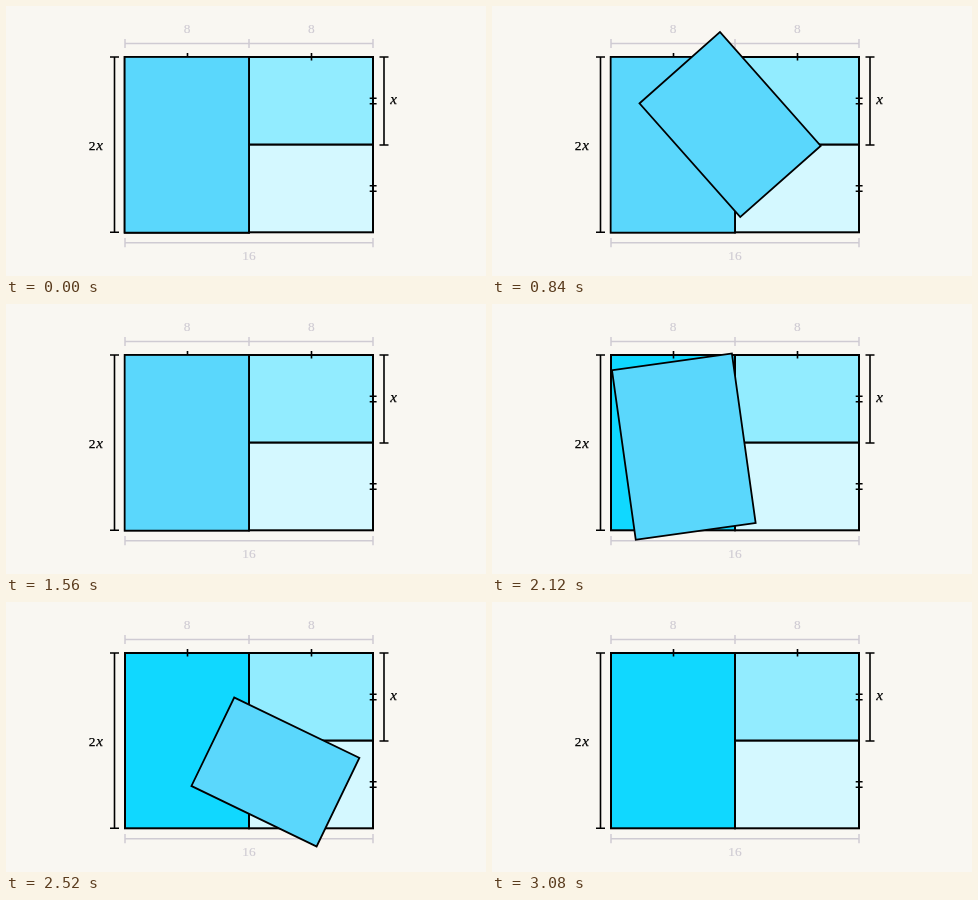
An HTML page for the animation above (3.48 s loop, 480 by 270 pixels).

```html
<!DOCTYPE html>
<html lang="en">
<head>
<meta charset="utf-8">
<title>Similar rectangles</title>
<style>
  html, body { margin: 0; width: 100%; height: 100%; overflow: hidden; background: #f9f7f2; }
  svg { display: block; width: 100vw; height: 100vh; }
  text { font: 13.4px "Liberation Serif", "Times New Roman", serif; text-anchor: middle; }
  .dim { fill: none; stroke: #cfcbd3; stroke-width: 1.5; }
  .dim-label { fill: #cfcbd3; stroke: #cfcbd3; stroke-width: .15; }
  .mark { fill: none; stroke: #000; stroke-width: 1.6; }
  .var { fill: #000; stroke: #000; stroke-width: .25; text-anchor: start; }
  .it { font-style: italic; font-size: 15px; }
  .box { stroke: #000; stroke-width: 2; }
  .copy { fill: #5ad7fc; stroke: #000; stroke-width: 1.8; }
</style>
</head>
<body>
<svg viewBox="0 0 480 270">
  <g class="dim">
    <path d="M119 37.5H367M119 33V42M243 33V42M367 33V42"/>
    <path d="M119 236.7H367M119 232V241.3M367 232V241.3"/>
  </g>
  <g class="dim-label">
    <text x="181" y="27">8</text>
    <text x="305.3" y="27">8</text>
    <text x="243" y="253.7">16</text>
  </g>
  <g class="mark">
    <path d="M108.5 51V226.3M104 51H113M104 226.3H113"/>
    <path d="M378 51V139M373.5 51H382.5M373.5 139H382.5"/>
  </g>
  <text class="var" x="82.8" y="144.3">2<tspan class="it" x="90.2">x</tspan></text>
  <text class="var it" x="384.3" y="98.3">x</text>

  <g class="box">
    <rect x="119" y="51" width="124" height="175.3" fill="#10d8ff"/>
    <rect x="243" y="51" width="124" height="87.7" fill="#92ecff"/>
    <rect x="243" y="138.7" width="124" height="87.6" fill="#d4f8ff"/>
  </g>
  <path class="mark" d="M181.5 47V54.5M305.5 47V54.5M363.7 92.3H370.6M363.7 97.8H370.6M363.7 179.8H370.6M363.7 185.3H370.6"/>

  <rect class="copy" id="lower"/>
  <rect class="copy" id="upper"/>
</svg>
<script>
  const LOOP = 3480, STEP = 40, MOVE = 1045;
  const W = 124.3, H = 175.7, FROM = { x: 180.8, y: 138.8 };
  const copies = [
    { el: document.getElementById('upper'), start: 339, hide: 1560, x: 305, y: 95 },
    { el: document.getElementById('lower'), start: 1874, hide: 3080, x: 305, y: 182.5 }
  ];

  const smooth = u => u * u * u * (10 - 15 * u + 6 * u * u);
  const mix = (a, b, p) => a + (b - a) * p;

  function set(el, attrs) {
    for (const k in attrs) el.setAttribute(k, attrs[k]);
  }

  // Each copy slides, shrinks by 1/√2 and turns a quarter counterclockwise.
  function place(c, t) {
    const p = smooth(Math.min(1, Math.max(0, (t - c.start) / MOVE)));
    const s = mix(1, Math.SQRT1_2, p), w = W * s, h = H * s;
    const x = mix(FROM.x, c.x, p), y = mix(FROM.y, c.y, p);
    set(c.el, {
      x: -w / 2, y: -h / 2, width: w, height: h,
      transform: `translate(${x} ${y}) rotate(${-90 * p})`,
      visibility: t < c.hide ? 'visible' : 'hidden'
    });
  }

  function draw() {
    const t = Math.floor(performance.now() % LOOP / STEP) * STEP;
    copies.forEach(c => place(c, t));
    requestAnimationFrame(draw);
  }
  draw();
</script>
</body>
</html>
```
